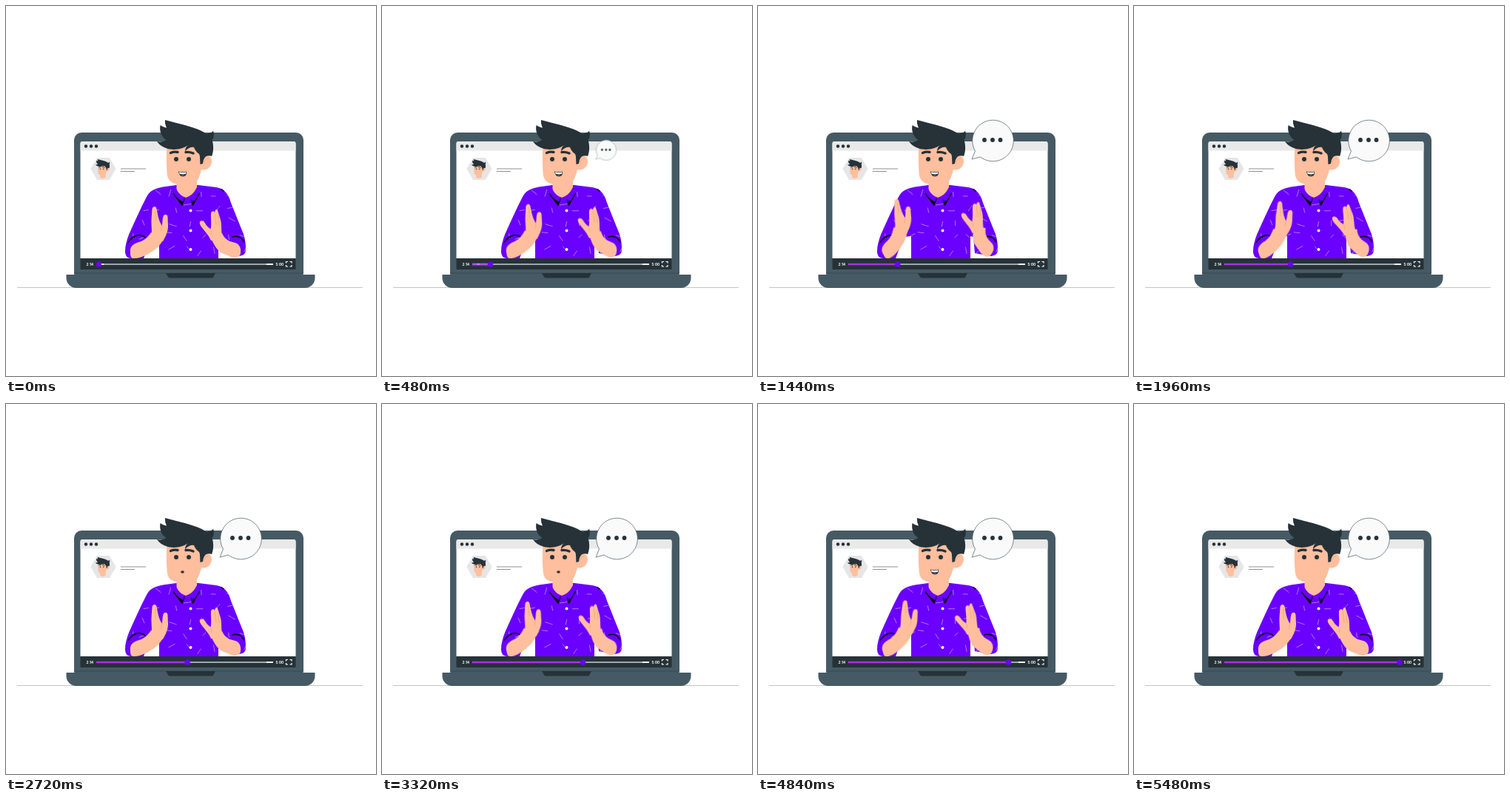
Write an HTML page that moves like this. It is 500 px wide and 500 px high and loops after 5.52 s.

```html
<!DOCTYPE html>
<html lang="en">
<head>
<meta charset="utf-8">
<title>Video call</title>
<style>
html, body { margin: 0; width: 100%; height: 100%; overflow: hidden; background: #fff; }
svg { display: block; width: 100%; height: 100%; }
text { font: 700 4.6px Inter, "Open Sans", sans-serif; fill: #fff; }
.skin { fill: #ffbe9d; }
.crease { fill: none; stroke: #eb9a78; stroke-width: .6; stroke-linecap: round; }
.dark { fill: #263238; }
.slate { fill: #455a64; }
.ink { fill: none; stroke: #0d0820; stroke-width: 1.5; stroke-linecap: round; stroke-linejoin: round; }

.arm, .hand { animation: 1380ms cubic-bezier(.37, 0, .63, 1) infinite alternate; }
.left .arm { animation-name: turnLeft; transform-origin: 175px 331px; }
.left .hand { animation-name: levelLeft; transform-origin: 203px 312px; }
.left .sway { animation: swayLeft 2760ms ease-in-out infinite; transform-origin: 203px 312px; }
.right .arm { animation-name: turnRight; transform-origin: 312px 331px; }
.right .hand { animation-name: levelRight; transform-origin: 288px 314px; }
.right .sway { animation: swayRight 2760ms ease-in-out infinite; transform-origin: 288px 314px; }
@keyframes turnLeft { to { transform: rotate(-26deg); } }
@keyframes levelLeft { to { transform: rotate(23deg); } }
@keyframes turnRight { to { transform: rotate(32deg); } }
@keyframes levelRight { to { transform: rotate(-31deg); } }
@keyframes swayLeft {
  0%, 20%, 51%, 100% { transform: rotate(0deg); }
  34% { transform: rotate(-5deg); }
  71% { transform: rotate(6.5deg); }
}
@keyframes swayRight {
  0%, 20%, 51%, 100% { transform: rotate(0deg); }
  34% { transform: rotate(-1deg); }
  71% { transform: rotate(-4deg); }
}

.bubble { transform-origin: 289px 207px; animation: grow 5520ms linear infinite; }
@keyframes grow { 0% { transform: scale(0); } 17.8%, 100% { transform: scale(1); } }
.knob { animation: slide 5520ms linear infinite; }
@keyframes slide { 0% { transform: translateX(0); } 96.2%, 100% { transform: translateX(233.7px); } }
.played { transform-origin: 122px 349px; animation: fill 5520ms linear infinite; }
@keyframes fill { 0% { transform: scaleX(.014); } 96.2%, 100% { transform: scaleX(1); } }

.smile { animation: smile 5520ms step-end infinite; }
.gasp { animation: gasp 5520ms step-end infinite; }
@keyframes smile { 0%, 68% { opacity: 1; } 44%, 92%, 100% { opacity: 0; } }
@keyframes gasp { 0%, 68%, 100% { opacity: 0; } 44% { opacity: 1; } }
</style>
</head>
<body>
<svg viewBox="0 0 500 500">
  <defs>
    <path id="shirt" d="M230 242 L212 244.500 C200 247 194 250 190 258 C182 273 174 291 166 309 C163 317 161 324 161 331 C161 338 164 341 170 341 L186 341 L197 312 L207 311 V341 H287 V311 L291 312 L293 334 L315 338 C321 337 324 335 324 329 C324 319 323 312 318 301 L304 266 C301 255 296 247 284 245 L260 242 Z"/>
    <clipPath id="cloth"><use href="#shirt"/></clipPath>
    <g id="head">
      <path class="skin" d="M218 186 C216 200 217 212 217.500 225 C218 235 223 239.500 230.500 240.500 V252 Q235 259 244 259 Q252 257 258 245 V237 C261 232 263 226 264 221 C272 223 278 217 278 210 C278 203 272 199 266 205 L264 184 Z"/>
      <path class="crease" d="M267 212 Q269 206 273 206"/>
      <path class="dark" d="M215 154 L230 158 C246 162 262 166 271 173 C274 172 278 172 280 168.500 C281.500 173 281 178 278.500 181 C281 189 280.500 197 278 203 C272 201 267 203 266 213 L262.500 214 C262 207 262.500 203 261 200 C258 198 255 194 254 191 C250 190 246 192 242 196 C242 192 244 190 246 188 C238 194 226 195 219 193 C213 191 208 189 204 183 C209 184 214 183 216.500 181 C210 177 207 169 208.500 161 C211 163 214 164 217 164.500 C215.500 161 214.500 158 215 154 Z"/>
      <circle class="dark" cx="230" cy="207" r="3"/>
      <circle class="dark" cx="247" cy="207" r="3"/>
      <path d="M222.500 198.500 Q227 196.500 232 197.500 M243 197.500 Q248 197 253 199" fill="none" stroke="#263238" stroke-width="3.400" stroke-linecap="round"/>
    </g>
  </defs>

  <path d="M15 380.500 H482" stroke="#c4c4c4"/>
  <rect class="slate" x="92" y="171" width="310" height="200" rx="10"/>
  <rect x="100.500" y="183" width="291" height="160" rx="3" fill="#fff"/>
  <path d="M100.500 195.500 V186 Q100.500 183 103.500 183 H388.500 Q391.500 183 391.500 186 V195.500 Z" fill="#e9e9e9"/>
  <g class="dark">
    <circle cx="108" cy="189.500" r="2.200"/>
    <circle cx="115" cy="189.500" r="2.200"/>
    <circle cx="122" cy="189.500" r="2.200"/>
  </g>

  <path d="M114.500 220 L123 205 H140 L148.500 220 L140 235 H123 Z" fill="#e6e6e6"/>
  <use href="#head" transform="translate(70 168.500) scale(.25)"/>
  <path class="skin" d="M127.500 228 H134.500 L135 232 H127 Z"/>
  <path d="M155 220 H189 M155 223.500 H174" stroke="#8f8f8f"/>

  <use href="#shirt" fill="#6a00ff"/>
  <g id="dashes" clip-path="url(#cloth)" stroke="#c9adff" stroke-width=".7" stroke-linecap="round"/>
  <path d="M287 311 V264 M207 311 V275" stroke="#5000cc" stroke-width=".6"/>
  <use href="#head"/>
  <path d="M229 244 L226 255 L238 270 L243 259 Q234 256 230 247 Z M259 243 L262 253 L252 270 L249 262 L243 259 Q254 255 258 246 Z" fill="#6a00ff"/>
  <path class="ink" d="M226.500 254 L238 269 L241 261 M261.500 253 L252.500 269 L250.500 262"/>
  <path d="M227 256 L238 270 L239 265 Z M252 270 L253 262 L256 264 Z" fill="#0d0820"/>
  <g fill="#fff">
    <circle cx="249.500" cy="276.500" r="2"/>
    <circle cx="249.500" cy="303.500" r="2"/>
    <circle cx="249.500" cy="329" r="2"/>
  </g>
  <path class="ink" d="M165.500 319 Q175 304 188.500 313 M168 316 Q177 307 186 311 M306 312 Q317 309 321.500 319 M308 311.500 Q317 311 321 317"/>
  <path class="ink" d="M291 247.500 L294 250"/>

  <g class="smile">
    <path class="dark" d="M233 223.500 Q239 225 244 223.500 Q244.500 230.500 239 230.500 Q234 230 233 223.500 Z"/>
    <path d="M234 224.300 Q239 225.500 243.300 224.300 L243 227 Q238 228 234.500 226.800 Z" fill="#fff"/>
    <path d="M236.500 229.300 Q239 227.500 241.500 229.300 Q239 231 236.500 229.300 Z" fill="#7a3cc8"/>
  </g>
  <ellipse class="gasp dark" cx="238.500" cy="227" rx="2.300" ry="1.700"/>

  <g class="left">
    <g class="arm">
      <path class="skin" d="M168 333 C167 325 172 321 180 319 C187 317 192 312 196 306 L213 315 C209 322 204 328 197 332 C190 337 177 343 170 340.500 C168 339 168 336 168 333 Z"/>
      <g class="hand"><g class="sway">
        <path class="skin" d="M196 310 C198 303 196 297 196.500 289 L197.500 274 C198.500 270 203 270 203.500 274 L205.500 284 C207 290 209 294 210.500 297 C212 293 211 288 212.500 284 C214 281 218 281 218.500 285 L219 297 C219 304 217 309 212 318 L200 318 Z"/>
        <path class="crease" d="M201.500 277 L202.500 290 M210.500 297 Q211 301 209.500 304"/>
      </g></g>
    </g>
  </g>
  <g class="right">
    <g class="arm">
      <path class="skin" d="M277 314 L292 307 C295 314 300 318 308 319.500 C316 321 318 328 317 334 C316 340 310 341 304 339 L290 333 C284 328 281 322 277 314 Z"/>
      <g class="hand"><g class="sway">
        <path class="skin" d="M277 317 C274 310 270 306 266 301 C263 297 261 294 262 291.500 C263.500 289.500 267 290 269 293.500 C271 297 274 300 276.500 301.500 C278 295 276.500 286 277 280 C278 276.500 281 276.500 282 279 C282.500 274 286 274 286.500 278 L290 289 C292 297 290 304 293 314 Z"/>
        <path class="crease" d="M282 279 L284 295 M287 283 L288 296 M276.500 301.500 Q278 305 277.500 308"/>
      </g></g>
    </g>
  </g>

  <rect class="dark" x="100.500" y="341" width="291" height="15"/>
  <path d="M92 361 H402" stroke="#37474f" stroke-width=".8"/>
  <path class="slate" d="M81.500 363 H417.500 V367.500 A13.500 13.500 0 0 1 404 381 H95 A13.500 13.500 0 0 1 81.500 367.500 Z"/>
  <path class="dark" d="M216 361 H283 L279.500 367.500 H220 Z"/>
  <text x="108.500" y="350.600">2:14</text>
  <text x="364.500" y="350.600">5:00</text>
  <path d="M122 349 H361" stroke="#c9ced0" stroke-width="1.400"/>
  <path d="M128 349 H132 M352 349 H361" stroke="#fff" stroke-width="2"/>
  <path class="played" d="M122 349 H359" stroke="#ac30e4" stroke-width="2.400"/>
  <circle class="knob" cx="125.300" cy="349" r="3.700" fill="#6a00ff"/>
  <path d="M378.500 347.500 V345.500 H381 M383.500 345.500 H386 V347.500 M386 350 V352 H383.500 M381 352 H378.500 V350" fill="none" stroke="#fff" stroke-width="1.200"/>

  <g class="bubble">
    <path d="M293.500 196 A27.800 27.800 0 1 1 300.500 204 L289 207 Z" fill="#fafafa" stroke="#455a64" stroke-width=".7" stroke-linejoin="round"/>
    <g class="dark">
      <circle cx="306" cy="181" r="2.900"/>
      <circle cx="317" cy="181" r="2.900"/>
      <circle cx="327.500" cy="181" r="2.900"/>
    </g>
  </g>
</svg>
<script>
// Scatter short dashes over the shirt on a jittered grid.
let seed = 11;
const rand = () => (seed = (seed * 16807) % 2147483647) / 2147483647;
let marks = "";
for (let y = 254; y < 340; y += 19) {
  for (let x = 168; x < 325; x += 19) {
    const cx = x + rand() * 10 - 5, cy = y + rand() * 10 - 5;
    const angle = rand() * Math.PI, half = 2.5 + rand() * 2.5;
    const dx = Math.cos(angle) * half, dy = Math.sin(angle) * half;
    marks += `M${cx - dx} ${cy - dy}L${cx + dx} ${cy + dy}`;
  }
}
const path = document.createElementNS("http://www.w3.org/2000/svg", "path");
path.setAttribute("d", marks);
document.getElementById("dashes").append(path);
</script>
</body>
</html>
```
